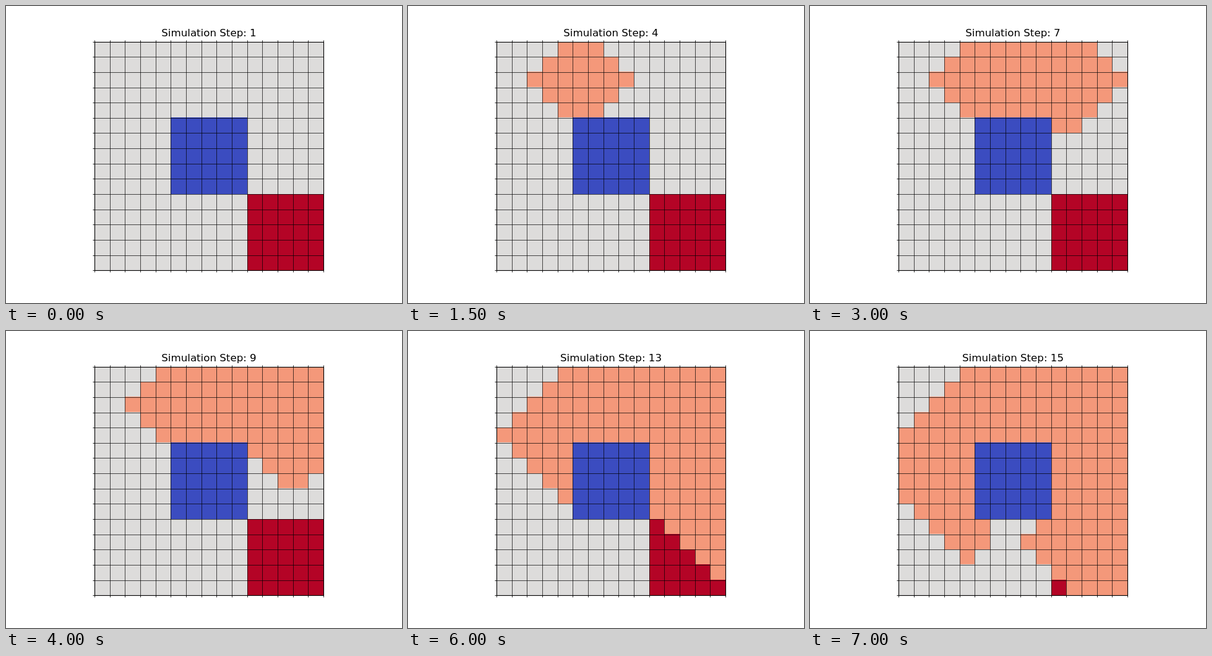
An HTML page for the animation above (7500 ms loop, 640x480 px).

```html
<!DOCTYPE html>
<html lang="en">
<head>
<meta charset="utf-8">
<title>Simulation</title>
<style>
  html, body { margin: 0; width: 100%; height: 100%; overflow: hidden; background: #fff; }
  svg { display: block; width: 640px; height: 480px; }
  text { font: 16.667px "DejaVu Sans", sans-serif; text-anchor: middle; }
</style>
</head>
<body>
<svg viewBox="0 0 640 480">
  <g id="cells" shape-rendering="crispEdges"></g>
  <g id="lines"></g>
  <text id="title" x="328" y="49"></text>
</svg>
<script>
const N = 15, CELL = 24.64, LEFT = 143.2, TOP = 57.6;
const STEP_MS = 500, STEPS = 15, TURN = 12;
const COLORS = { ground: '#dddcdb', wall: '#3b4cc0', block: '#b40426', spread: '#f4987a' };

const byId = id => document.getElementById(id);
const cellsLayer = byId('cells'), linesLayer = byId('lines'), title = byId('title');

function add(parent, tag, attrs) {
  const el = document.createElementNS('http://www.w3.org/2000/svg', tag);
  for (const key in attrs) el.setAttribute(key, attrs[key]);
  parent.appendChild(el);
  return el;
}

const fillX = i => Math.round(LEFT + i * CELL);
const fillY = j => j ? Math.floor(TOP + j * CELL + 1e-6) : 58;
const lineX = i => Math.round(LEFT + i * CELL);
const lineY = j => Math.round(TOP + j * CELL);

function terrain(x, y) {
  if (x >= 5 && x < 10 && y >= 5 && y < 10) return 'wall';
  return x >= 10 && y >= 10 ? 'block' : 'ground';
}

// Each cell spreads to a plus shape centred one cell downwind.
function spread(cells, dx, dy) {
  const next = new Set(cells);
  for (const id of cells) {
    const cx = id % N + dx, cy = Math.floor(id / N) + dy;
    for (const [ox, oy] of [[0, 0], [1, 0], [-1, 0], [0, 1], [0, -1]]) {
      const x = cx + ox, y = cy + oy;
      const inside = x >= 0 && y >= 0 && x < N && y < N;
      if (inside && terrain(x, y) !== 'wall') next.add(y * N + x);
    }
  }
  return next;
}

const states = [new Set()];
let front = new Set([2 * N + 2]);
for (let step = 2; step <= STEPS; step++) {
  front = step < TURN ? spread(front, 1, 0) : spread(front, 0, 1);
  states.push(front);
}

const cells = [];
for (let y = 0; y < N; y++) {
  for (let x = 0; x < N; x++) {
    cells.push(add(cellsLayer, 'rect', {
      x: fillX(x), y: fillY(y),
      width: fillX(x + 1) - fillX(x), height: fillY(y + 1) - fillY(y)
    }));
  }
}

function bar(x, y, width, height, opacity) {
  add(linesLayer, 'rect', { x, y, width, height, 'fill-opacity': opacity });
}

const x0 = lineX(0), x1 = lineX(N), y0 = lineY(0), y1 = lineY(N);
for (let i = 0; i <= N; i++) {
  const x = lineX(i), y = lineY(i);
  if (i > 0 && i < N) {
    bar(x, y0, 1, y1 - y0, 0.69);
    bar(x0, y, x1 - x0, 1, 0.69);
  }
  bar(x, y0 - 2.5, 1, 2.5, 0.83);
  bar(x, y1 + 1, 1, 2.5, 0.83);
  bar(x0 - 2.5, y, 2.5, 1, 0.83);
}
add(linesLayer, 'rect', {
  x: x0 + 0.5, y: y0 + 0.5, width: x1 - x0, height: y1 - y0,
  fill: 'none', stroke: '#000', 'stroke-width': 1.11
});

let shown = -1;
function draw(index) {
  if (index === shown) return;
  shown = index;
  title.textContent = `Simulation Step: ${index + 1}`;
  cells.forEach((cell, id) => {
    const kind = states[index].has(id) ? 'spread' : terrain(id % N, Math.floor(id / N));
    cell.setAttribute('fill', COLORS[kind]);
  });
}

const start = performance.now();
function tick() {
  draw(Math.floor((performance.now() - start) / STEP_MS) % STEPS);
  requestAnimationFrame(tick);
}
tick();
</script>
</body>
</html>
```
